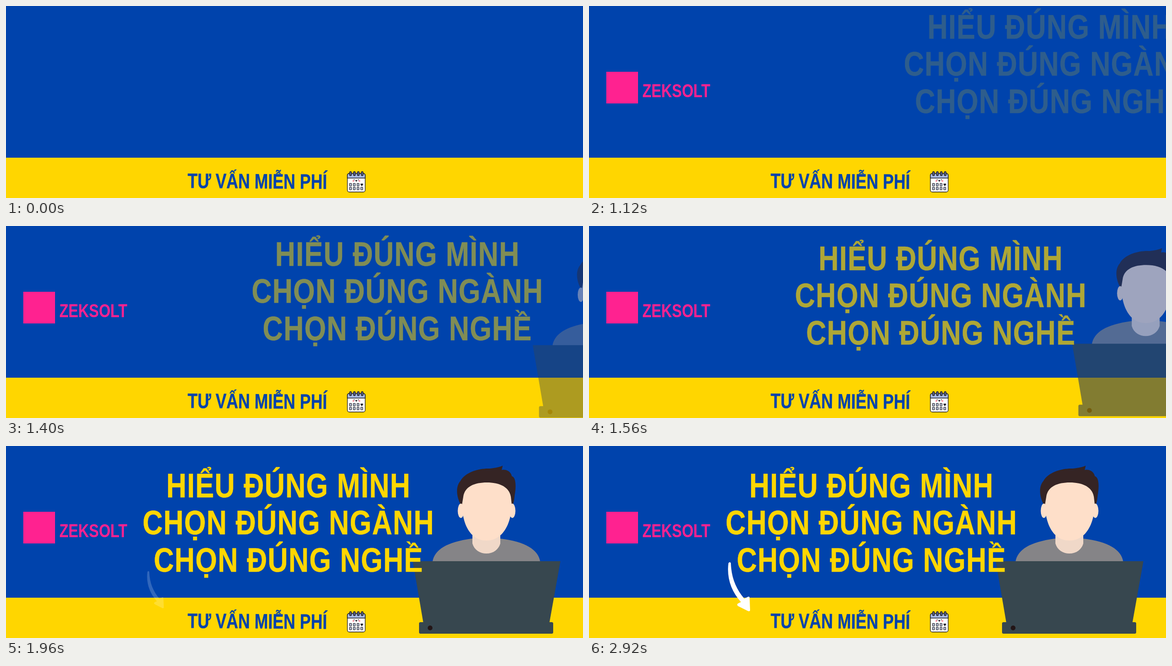
Write an HTML page that moves like this. It is 1200 px wide and 400 px high and loops after 3520 ms.

```html
<!DOCTYPE html>
<html lang="vi">
<head>
<meta charset="utf-8">
<title>Tư vấn miễn phí</title>
<style>
  html, body { margin: 0; width: 100%; height: 100%; overflow: hidden; background: #0043ac; }
  svg { display: block; width: 1200px; height: 400px; }
  text { font-family: "Liberation Sans", Arial, sans-serif; font-weight: 700; }
  .head { font-size: 71px; letter-spacing: 1.5px; text-anchor: middle; fill: #ffd600; stroke: #ffd600; stroke-width: .5px; }
  .cta { font-size: 43.5px; text-anchor: middle; fill: #0043ac; stroke: #0043ac; stroke-width: .4px; }
  .brand { font-size: 39.5px; fill: #ff2290; }
</style>
</head>
<body>
<svg viewBox="0 0 1200 400" xmlns="http://www.w3.org/2000/svg">
  <rect width="1200" height="400" fill="#0043ac"/>
  <rect y="316" width="1200" height="84" fill="#ffd600"/>

  <text class="cta" transform="translate(522.5 380) rotate(.4) scale(.78 1)">TƯ VẤN MIỄN PHÍ</text>

  <g id="calendar" stroke="#23232b" stroke-width="1.3">
    <rect x="710" y="349" width="37" height="38.5" rx="4" fill="#fff"/>
    <path d="M710 358.5V353Q710 349 714 349H743Q747 349 747 353V358.5Z" fill="#a9bbe6"/>
    <g id="rings" fill="#5b6486"></g>
    <g id="days" fill="#c3cbe0" stroke-width="1.2"></g>
    <path d="M740 375.5L737 371.5Q738 368.5 740 370.5Q742 368.5 743 371.5Z" fill="#23232b" stroke="none"/>
    <g stroke="none">
      <circle cx="722.5" cy="364.5" r="2" fill="#ff9aa8"/>
      <circle cx="735" cy="364.5" r="2" fill="#ff9aa8"/>
      <path d="M726 362.5H731L728.5 366.5Z" fill="#23232b"/>
      <circle cx="724" cy="362" r=".9" fill="#23232b"/>
      <circle cx="733" cy="362" r=".9" fill="#23232b"/>
    </g>
  </g>

  <g id="brand">
    <rect x="36" y="137" width="66" height="66" fill="#ff2290"/>
    <text class="brand" transform="translate(111 190) scale(.78 1)">ZEKSOLT</text>
  </g>

  <g id="person">
    <path d="M887 241C891 216 917 200 968 193H1028C1080 199 1107 216 1111 241Z" fill="#858487"/>
    <path d="M970 180H1028V203C1024 217 1012 224 999 224C986 224 974 217 970 203Z" fill="#f0d8c8"/>
    <path d="M947 124C936 106 935 84 945 73C955 54 985 46 1006 47C1017 46 1026 44 1033 41L1031 50C1042 48 1050 54 1052 63C1061 65 1061 86 1058 102C1057 112 1056 119 1053 125Z" fill="#352424"/>
    <ellipse cx="946" cy="135" rx="6.5" ry="15" fill="#fedfc9"/>
    <ellipse cx="1053" cy="135" rx="6.5" ry="15" fill="#fedfc9"/>
    <path d="M951 106C954 84 975 76 1000 76C1027 76 1047 86 1050 106L1052 124C1050 156 1040 177 1026 188C1011 200 987 200 973 188C959 177 950 156 948 124Z" fill="#fedfc9"/>
    <path d="M846 240H1153L1130 369H868Z" fill="#37474f"/>
    <rect x="859" y="367" width="279" height="24" rx="3" fill="#37474f"/>
    <circle cx="882" cy="379" r="5" fill="#231516"/>
  </g>

  <g id="heads">
    <text class="head" transform="translate(587.5 106.7) scale(.82 1)">HIỂU ĐÚNG MÌNH</text>
    <text class="head" transform="translate(587.5 184.2) scale(.82 1)">CHỌN ĐÚNG NGÀNH</text>
    <text class="head" transform="translate(587.5 261.7) scale(.82 1)">CHỌN ĐÚNG NGHỀ</text>
  </g>

  <path id="arrow" fill="#fff" d="M290 244Q293 240 295 244C296 275 306 298 323 318L331 314Q334 313 334 317L335 342Q335 345 331 344L311 334Q306 331 310 328L316 325C296 303 286 275 290 244Z"/>
</svg>
<script>
const LOOP = 3520, STEP = 40;
const $ = id => document.getElementById(id);

function addRect(parent, x, y, width, height, rx) {
  const r = document.createElementNS('http://www.w3.org/2000/svg', 'rect');
  const attrs = { x, y, width, height, rx };
  for (const k in attrs) r.setAttribute(k, attrs[k]);
  parent.append(r);
}
for (let i = 0; i < 4; i++) {
  addRect($('rings'), 714.5 + 8.1 * i, 345, 4, 8.5, 2);
  for (let j = 0; j < 2; j++) {
    if (i < 3 || j) addRect($('days'), 714.5 + 7.8 * i, 369.5 + 8 * j, 4, 5.5, .5);
  }
}

// Linear entrances; each part stays hidden until `show`.
const parts = [
  { el: $('brand'), from: 0, to: 960, show: 160 },
  { el: $('heads'), from: 960, to: 1840, show: 1120,
    pose: left => `translate(${.515 * left} ${-.054 * left})` },
  { el: $('person'), from: 1100, to: 1840, show: 1120,
    pose: left => `translate(${.567 * left} ${.0185 * left})` },
  { el: $('arrow'), from: 1800, to: 2640, show: 1960,
    pose: left => `translate(307 318) scale(${1 - .3 * left / 840}) translate(-307 -318)` }
];

function draw(t) {
  for (const { el, from, to, show, pose } of parts) {
    const p = Math.min(1, Math.max(0, (t - from) / (to - from)));
    el.setAttribute('opacity', t < show ? 0 : p);
    if (pose) el.setAttribute('transform', pose((1 - p) * (to - from)));
  }
}

const start = performance.now();
function tick() {
  const t = (performance.now() - start) % LOOP;
  draw(Math.floor(t / STEP) * STEP);
  requestAnimationFrame(tick);
}
tick();
</script>
</body>
</html>
```
